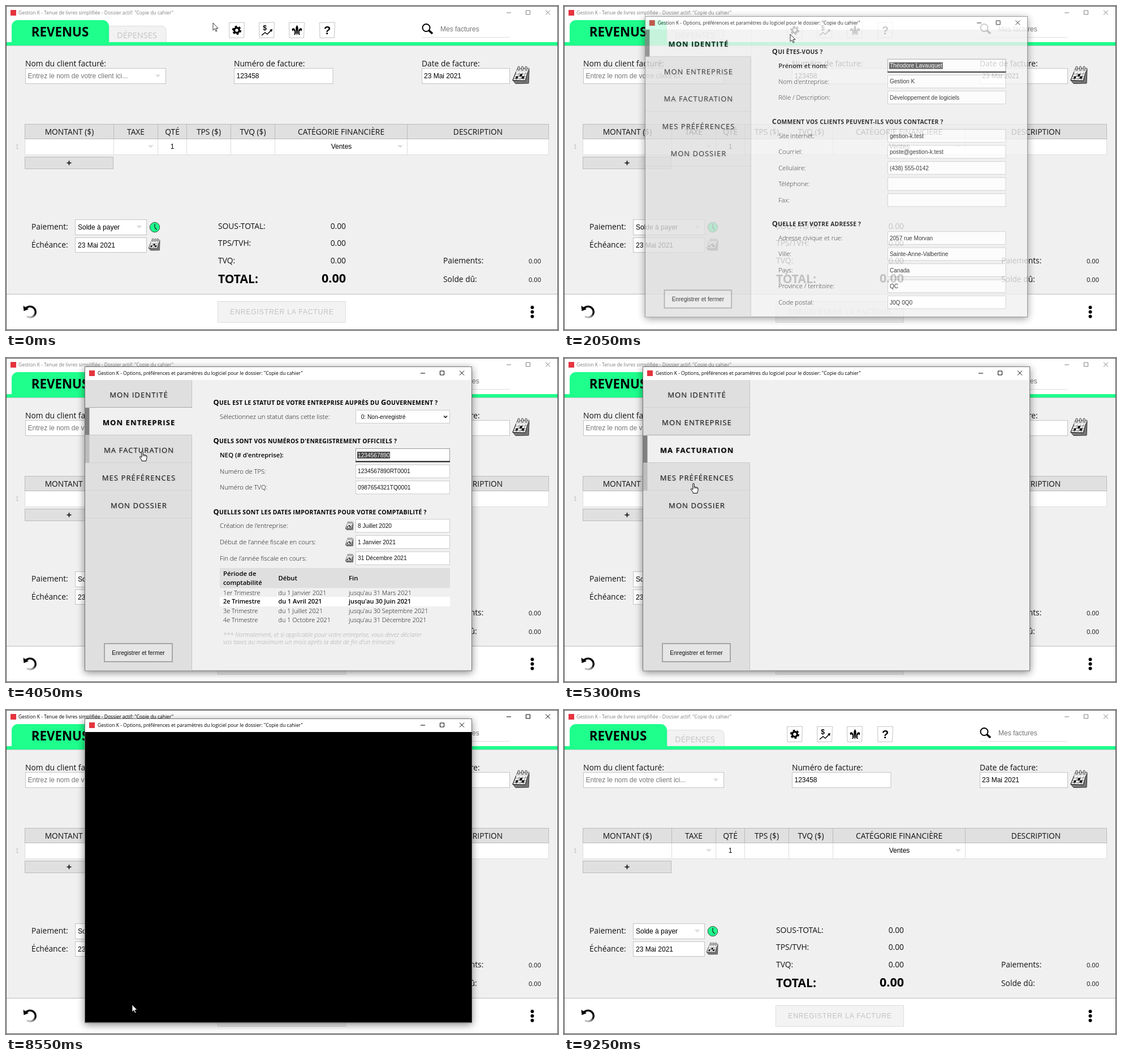
Recreate the animation shown at these times as an HTML page. Size 976 by 574 pixels, loop 9400 ms.

```html
<!DOCTYPE html>
<html lang="fr">
<head>
<meta charset="utf-8">
<title>Options du logiciel</title>
<style>
html, body { margin: 0; width: 100%; height: 100%; overflow: hidden; background: #f0f0f0; }
svg { display: block; }
text { font-family: "Open Sans", "Noto Sans", sans-serif; font-size: 13.8px; fill: #111; white-space: pre; }
.m { text-anchor: middle; }
.e { text-anchor: end; }
.f { font-family: "Liberation Sans", Arial, sans-serif; font-size: 12px; fill: #000; }
.s { font-family: "Liberation Sans", Arial, sans-serif; font-size: 10.2px; fill: #111; }
.g { fill: #757575; }
.t { font-size: 8.5px; fill: currentColor; }
.d { font-size: 11.3px; font-weight: 300; }
.r { font-size: 10.9px; font-weight: 300; }
.b { font-weight: 600; fill: #000; }
.h { font-size: 10.4px; font-weight: 700; letter-spacing: .25px; fill: #000; }
.cap { font-size: 12.8px; }
.n { font-size: 10.9px; font-weight: 300; font-style: italic; fill: #aaa; }
.tab { font-size: 13px; letter-spacing: 1.1px; text-anchor: middle; text-shadow: 1px 1px 2px #0003; }
.on { font-weight: 700; fill: #000; }
.tip { font-size: 12.2px; fill: #fff; }
.key { font: bold 10px "Liberation Mono", monospace; fill: #222; text-anchor: middle; }
.box { fill: #fff; stroke: #c4c4c4; }
.head { fill: #e0e0e0; stroke: #bbb; }
.a { animation: 9.4s step-end infinite; }
#active { color: #808080; animation: active 9.4s step-end infinite; }
#tip { animation: tip 9.4s linear infinite; }
#dialog { transform-origin: 481.75px 284.5px; animation: dialog 9.4s ease-out infinite; }
#cursor { animation: cursor 9.4s ease-in-out infinite; }
@keyframes active {
  15.4% { color: #000; } 20.2% { color: #808080; }
  90.4% { color: #000; } 98.4% { color: #808080; }
}
@keyframes tip {
  0%, 6.4% { opacity: 0; } 10.1%, 15.4% { opacity: 1; } 19.1%, 100% { opacity: 0; }
}
@keyframes dialog {
  0%, 20.2% { opacity: 0; transform: scale(.9); }
  21.81% { opacity: .8; transform: scale(.9883); }
  23.4%, 91.4% { opacity: 1; transform: none; }
  93.6%, 100% { opacity: 0; transform: scale(.9); }
}
@keyframes cursor {
  0%, .4% { transform: translate(366px, 30px); }
  6%, 11.2% { transform: translate(400px, 48px); }
  11.7%, 26.4% { transform: translate(400px, 50px); }
  35.1%, 40.2% { transform: translate(247px, 120px); }
  43.09% { transform: translate(241px, 165px); }
  46.3%, 48.7% { transform: translate(234px, 168px); }
  48.9%, 50.3% { transform: translate(233px, 169px); }
  54.8%, 56.2% { transform: translate(230px, 221px); }
  56.4%, 66.8% { transform: translate(229px, 222px); }
  70.2%, 71.6% { transform: translate(227px, 263px); }
  71.8%, 79.6% { transform: translate(227px, 264px); }
  86.7%, 100% { transform: translate(223px, 522px); }
}
</style>
</head>
<body>
<script>
const LOOP = 9400;

// Visible spans in ms: start, end, start, end...
const spans = {
  page0: [0, 3500], page1: [3500, 4750], page2: [4750, 5850], page3: [5850, 7050], page4: [7050, LOOP],
  over1: [2950, 3500], over2: [3880, 4750], over3: [4950, 5850], over4: [6400, 7050],
  focus: [3500, 4600], gear: [350, 1900], press: [8000, 8500], black: [8500, LOOP],
  arrow: [0, 350, 1900, 2950, 7600, 8000, 8500, 9250], hand: [350, 1900, 2950, 7600, 8000, 8500]
};
const frames = Object.entries(spans).map(([name, times]) =>
  `@keyframes ${name}{0%{visibility:hidden}` + times.map((t, i) =>
    `${t / LOOP * 100}%{visibility:${i % 2 ? 'hidden' : 'visible'}}`).join('') + '}').join('\n');
document.head.appendChild(document.createElement('style')).textContent = frames;

const show = (name, body) => `<g class="a" style="animation-name:${name}">${body}</g>`;
const text = (x, y, s, c = '') => `<text x="${x}" y="${y}" class="${c}">${s}</text>`;
const rect = (x, y, w, h, attr = 'class="box"') => `<rect x="${x}" y="${y}" width="${w}" height="${h}" ${attr}/>`;
const path = (d, attr = '') => `<path d="${d}" ${attr}/>`;
const line = (d, color = '#000', w = 1) => path(d, `fill="none" stroke="${color}" stroke-width="${w}"`);
const drop = (x, y) => path(`M${x - 5} ${y - 2.5}h10l-5 5z`, 'fill="#ddd"');
const calendar = (x, y, w) => `<use href="#cal" x="${x}" y="${y}" width="${w}" height="${w * 34 / 32}"/>`;
const list = (items, fn) => items.map(fn).join('');

const controls = (x, y) => line(`M${x} ${y + .5}h8M${x + 34.5} ${y - 3.5}h7v7h-7zM${x + 69} ${y - 4}l8 8m0 -8l-8 8`, 'currentColor');
const logo = (x, y) => rect(x, y, 10, 10, 'fill="#e5343f"');
const product = 'Gestion K', folder = '"Copie du cahier"';

/* main window */
const frame = (x, hot) => path(`M${x + .5} 29.5l27 -.5l-1 27.2l-25.5 .3z`,
  hot ? 'fill="#fff" stroke="#222" stroke-width="1.6"' : 'fill="#fff" stroke="#c4c4c4"');
const gear = `<g fill="none" stroke="#000"><circle cx="408" cy="43" r="4.4" stroke-width="3.4"/>
  <circle cx="408" cy="43" r="6.8" stroke-width="2.6" stroke-dasharray="3.8 3.32"/></g>`;
const curl = path('M1.9 3C2.5-1 5-4.6 7.6-3.6C9.6-2.6 9 1.4 6.6 1.6C7.2-.6 6-1.4 4 3ZM2 5H4.3C4 7 5 7.5 6 7C5 9 2.5 8.5 2 5Z');
const lily = `<g transform="translate(514.5 43)">${path('M0-9C2.8-5.5 2.8-2 1 3H-1C-2.8-2-2.8-5.5 0-9ZM-5 3.2H5V4.8H-5ZM-1.3 5H1.3L0 9Z')}
  ${curl}<g transform="scale(-1 1)">${curl}</g></g>`;

const toolbar = list([394, 447, 500, 554], x => frame(x)) + show('gear', frame(394, true)) + gear +
  text(457.5, 43, '$', 'f m b') + line('M452 52l6 -5l4 3l7 -7', '#000', 1.5) + path('M471 41l-1 5l-4 -4z') +
  lily + text(568, 50, '?', 'f m" style="font-size:20px;font-weight:700') +
  `<circle cx="743" cy="38.5" r="6.5" fill="none" stroke="#000" stroke-width="2"/>` + line('M748 43.5l6 5.5', '#000', 3.6) +
  text(768, 45, 'Mes factures', 'f g') + line('M735 55.5h155', '#ddd');

const header = rect(0, 0, 976, 64, 'fill="#fff"') + logo(8, 7) +
  `<g id="active">${text(22, 15, `${product} - Tenue de livres simplifiée - Dossier actif: ${folder}`, 't')}${controls(885, 11.5)}</g>` +
  path('M182.5 64V35.5H275a8 8 0 0 1 8 8V64', 'fill="#f2f2f2" stroke="#ddd"') +
  text(231.5, 57, 'DÉPENSES', 'm" style="font-size:14.6px;fill:#c4c4c4') +
  path('M10 70V36a11 11 0 0 1 11 -11H171a11 11 0 0 1 11 11V64H976V70H0V64H10z', 'fill="#1eff8c"') +
  line('M0 70.5H976', '#ccc') + text(95.5, 54, 'REVENUS', 'm" style="font-size:22.3px;font-weight:700;fill:#000');

const fields = text(34, 106.5, 'Nom du client facturé:') + rect(34.5, 110.5, 248, 27) +
  text(38.5, 128, 'Entrez le nom de votre client ici...', 'f g') + drop(268.5, 124) +
  text(403, 106.5, 'Numéro de facture:') + rect(403.5, 110.5, 174.5, 27) + text(407.5, 128, '123458', 'f') +
  text(735, 106.5, 'Date de facture:') + rect(735.5, 110.5, 155, 27) + text(739, 128, '23 Mai 2021', 'f') + calendar(895, 105.5, 32);

const cols = [33.5, 190.5, 268.5, 319.5, 397.5, 475.5, 709.5, 959.5];
const titles = ['MONTANT ($)', 'TAXE', 'QTÉ', 'TPS ($)', 'TVQ ($)', 'CATÉGORIE FINANCIÈRE', 'DESCRIPTION'];
const table = list(titles, (s, i) => {
  const x = cols[i], w = cols[i + 1] - x;
  return rect(x, 235.5, w, 28, 'fill="#fff" stroke="#ddd"') + rect(x, 209.5, w, 26, 'class="head"') + text(x + w / 2, 228.3, s, 'm');
}) + text(17, 253, '1', 's" style="fill:#bbb') + drop(256, 249) + text(294, 252.5, '1', 'f m') +
  text(593, 252.5, 'Ventes', 'f m') + drop(697, 249) + rect(33.5, 267.5, 156, 21, 'class="head"') + line('M107.5 278h8m-4 -4v8', '#000', 1.5);

const totals = text(45, 396, 'Paiement:') + rect(122.5, 378.5, 126, 27) + text(127, 396, 'Solde à payer', 'f') + drop(235.5, 391.5) +
  text(45, 427.5, 'Échéance:') + rect(122.5, 410.5, 126, 26) + text(127, 427.5, '23 Mai 2021', 'f') +
  '<circle cx="263" cy="392" r="8.7" fill="#1eff8c" stroke="#444"/>' + line('M263 386v6.5l3.5 4', '#222', 1.3) + calendar(251.5, 411, 22) +
  list([['SOUS-TOTAL:', 394.5], ['TPS/TVH:', 425], ['TVQ:', 456]], ([s, y]) => text(375, y, s) + text(601, y, '0.00', 'e')) +
  text(375, 490.5, 'TOTAL:', '" style="font-size:21px;font-weight:700;fill:#000') +
  text(601, 490, '0.00', 'e" style="font-size:21.5px;font-weight:700;fill:#000') +
  list([['Paiements:', 456], ['Solde dû:', 489]], ([s, y]) => text(773, y, s) + text(946, y - .5, '0.00', 'e" style="font-size:11.1px'));

const footer = rect(0, 511, 976, 63, 'fill="#fff"') + line('M0 510.5H976', '#bbb') +
  rect(374.5, 523.5, 226, 37, 'fill="#f3f3f3" stroke="#ddd"') +
  text(488, 546, 'ENREGISTRER LA FACTURE', 'f m" style="font-size:12.2px;letter-spacing:.8px;fill:#c2c2c2') +
  line('M35 536a9.7 9.7 0 1 1 2 14', 'url(#fade)', 3.3) + path('M30.5 531l1 9.5l8.5 -3.5z') +
  list([534, 542, 550], y => `<circle cx="930.5" cy="${y}" r="3"/>`);

const tooltip = `<g id="tip">${path('M408 74.5l6 7h-12z', 'fill="#2f2f2f"')}${rect(318, 81, 179, 45, 'rx="4" fill="#2f2f2f"')}` +
  text(326, 98.5, 'Options du logiciel.', 'tip') + text(326, 116.5, '(Raccourci clavier :', 'tip') +
  rect(433, 105, 28, 16.5, 'rx="3" fill="#eee"') + text(447, 117, 'Alt', 'key') + text(462.5, 116.5, '+', 'tip') +
  rect(470.5, 105, 14.5, 16.5, 'rx="3" fill="#eee"') + text(477.8, 117, 'O', 'key') + text(485.5, 116.5, ')', 'tip') + '</g>';

/* options dialog */
const title = (y, s) => text(366.5, y, s.replace(/\p{L}/gu, c =>
  c === c.toUpperCase() ? `<tspan class="cap">${c}</tspan>` : c.toUpperCase()), 'h');
const row = (y, label, value, x = 573) => text(378, y + 4, label, 'd') +
  rect(x + .5, y - 11.5, 784 - x, 23, 'fill="#fff" stroke="#ccc"') + text(x + 4, y + 3.7, value, 's');
const focused = (y, label, value, x, w) => rect(377, y - 9, 160, 17, 'fill="#f0f0f0"') + text(378, y + 4, label, 'd b') +
  rect(x + .5, y - 11.5, 784 - x, 23, 'fill="#fff" stroke="#999"') + rect(x, y + 10.5, 785 - x, 2, 'fill="#111"') +
  rect(x + 3, y - 6, w, 12, 'fill="#444"') + text(x + 4, y + 3.7, value, 's" style="fill:#fff');
const check = (y, label, on) => text(378, y + 4, label, 'd') + (on
  ? rect(769.5, y - 7.5, 15, 15, 'rx="2" fill="#0075ff"') + line(`M772.5 ${y}l3.2 3.4l6 -7`, '#fff', 2.2)
  : rect(770, y - 7, 14, 14, 'rx="2" fill="#fff" stroke="#767676"'));

const identity = title(82.7, 'Qui êtes-vous ?') + focused(103.5, 'Prénom et nom:', 'Théodore Lavauquet', 573, 96) +
  row(132, "Nom d'entreprise:", product) + row(160.7, 'Rôle / Description:', 'Développement de logiciels') +
  title(208.5, 'Comment vos clients peuvent-ils vous contacter ?') +
  list([['Site internet:', 'gestion-k.test'], ['Courriel:', 'poste@gestion-k.test'], ['Cellulaire:', '(438) 555-0142'],
    ['Téléphone:', ''], ['Fax:', '']], ([a, b], i) => row(229.3 + i * 28.8, a, b)) +
  title(391.5, 'Quelle est votre adresse ?') +
  list([['Adresse civique et rue:', '2057 rue Morvan'], ['Ville:', 'Sainte-Anne-Valbertine'], ['Pays:', 'Canada'],
    ['Province / territoire:', 'QC'], ['Code postal:', 'J0Q 0Q0']], ([a, b], i) => row(412.5 + i * 28.8, a, b));

const quarters = [['1er Trimestre', 'du 1 Janvier 2021', "jusqu'au 31 Mars 2021", 419.5], ['2e Trimestre', 'du 1 Avril 2021', "jusqu'au 30 Juin 2021", 435],
  ['3e Trimestre', 'du 1 Juillet 2021', "jusqu'au 30 Septembre 2021", 452], ['4e Trimestre', 'du 1 Octobre 2021', "jusqu'au 31 Décembre 2021", 467.5]];
const company = title(83, 'Quel est le statut de votre entreprise auprès du Gouvernement ?') +
  row(104, 'Sélectionnez un statut dans cette liste:', '  0: Non-enregistré', 618) + line('M774 102.5l3 3l3 -3', '#111', 1.6) +
  title(151, "Quels sont vos numéros d'enregistrement officiels ?") +
  row(172, "NEQ (# d'entreprise):", '1234567890', 618) + show('focus', focused(172, "NEQ (# d'entreprise):", '1234567890', 618, 58)) +
  row(200.7, 'Numéro de TPS:', '1234567890RT0001', 618) + row(229.3, 'Numéro de TVQ:', '0987654321TQ0001', 618) +
  title(276.5, 'Quelles sont les dates importantes pour votre comptabilité ?') +
  list([["Création de l'entreprise:", '8 Juillet 2020'], ["Début de l'année fiscale en cours:", '1 Janvier 2021'],
    ["Fin de l'année fiscale en cours:", '31 Décembre 2021']], ([a, b], i) => row(297.3 + i * 28.7, a, b, 618) + calendar(599.5, 289 + i * 28.7, 15.5)) +
  rect(378, 372, 407, 35.5, 'fill="#dfdfdf"') + rect(378, 423, 407, 17, 'fill="#fff"') +
  text(384, 386, 'Période de', 'd b') + text(384, 402, 'comptabilité', 'd b') + text(481.5, 394, 'Début', 'd b') + text(606, 394, 'Fin', 'd b') +
  list(quarters, (q, i) => list([384, 481.5, 606], (x, k) => text(x, q[3], q[k], i === 1 ? 'r b' : 'r'))) +
  text(384, 494, '*** Normalement, et si applicable pour votre entreprise, vous devez déclarer', 'n') +
  text(384, 506.5, "vos taxes au maximum un mois après la date de fin d'un trimestre.", 'n');

const prefs = title(83, 'Table de transaction des factures:') + check(100, 'Afficher la colonne QTÉ (quantité):', 1) +
  check(121, 'Afficher les colonnes TPS ($) et TVQ ($):', 1) + check(142.3, 'Afficher les colonnes SOUS-TOTAL ($) et TOTAL ($):') +
  title(186, 'Réinitialisation des factures:') + check(202.7, 'Garder le dernier nom de client/fournisseur utilisé actif:') +
  check(224, 'Garder la dernière méthode de paiement utilisée active:') +
  title(267.5, 'Paiements des factures:') + check(284.7, 'Égaliser le montant total des paiements avec le total facturé:', 1) +
  check(306, 'Changer la date de facturation change aussi la date du paiement #1:', 1);

const tabs = ['MON IDENTITÉ', 'MON ENTREPRISE', 'MA FACTURATION', 'MES PRÉFÉRENCES', 'MON DOSSIER'];
const sidebar = rect(140, 39, 189, 514.5, 'fill="#dfdfdf"') + line('M328.5 39V553.5', '#c4c4c4') +
  list(tabs, (s, i) => {
    const y = 39 + i * 49.1, label = c => text(235, y + 30.5, s, 'tab ' + c);
    return line(`M140 ${Math.round(y + 49) - .5}H328`, '#d2d2d2') + label('') +
      (i ? show('over' + i, rect(140, y, 7.5, 48.5, 'fill="#bdbdbd"')) : '') +
      show('page' + i, rect(140, y, 189, 49, 'fill="#f0f0f0"') + rect(140, y, 7.5, 48.5, 'fill="#808080"') +
        (i ? line(`M147.5 ${Math.round(y) - .5}H329`, '#a8a8a8') : '') + line(`M147.5 ${Math.round(y + 49) - .5}H329`, '#c4c4c4') + label('on'));
  }) + rect(174, 506, 120, 32, 'fill="#e6e6e6" stroke="#a6a6a6" stroke-width="2"') +
  show('press', rect(174, 506, 120, 32, 'fill="#e6e6e6" stroke="#777" stroke-width="2"')) +
  text(234, 525.7, 'Enregistrer et fermer', 's m');

const dialog = `<g id="dialog">${rect(139.5, 15.5, 684, 538.5, 'fill="#f0f0f0" stroke="#777" style="filter:drop-shadow(0 3px 7px #0007)"')}` +
  rect(140, 16, 683, 23, 'fill="#fff"') + logo(147, 22) +
  text(162, 30, `${product} - Options, préférences et paramètres du logiciel pour le dossier: ${folder}`, 't') + controls(733, 26.5) +
  sidebar + show('page0', identity) + show('page1', company) + show('page3', prefs) +
  show('black', rect(140, 39, 683.5, 514.5, 'fill="#000"')) + '</g>';

const cursor = `<g id="cursor" stroke="#000" fill="#fff" stroke-linejoin="round">` +
  show('arrow', path('M0 0V13L3 10.2L5 15L7 14.2L5 9.5H9Z', 'stroke-width=".8"')) +
  show('hand', path('M-1.2 1.2C-1.2-.2 1.2-.2 1.2 1.2V6.3L3.5 6.7L6 7.4L8 8.5V12.5L6.8 16V17.5H-.8L-1.2 15.5L-4.5 10.8C-5 9.5-3.5 8.8-2.6 10L-1.2 11.3Z') +
    line('M1.2 6.3v3M3.6 6.8v2.7M6 7.5v2.3', '#000', .8)) + '</g>';

const defs = `<defs><linearGradient id="fade" x1=".6" y1="0" x2=".3" y2="1"><stop offset=".45"/><stop offset="1" stop-color="#ccc"/></linearGradient>
  <symbol id="cal" viewBox="0 0 32 34">${path('M1 26l5 6l23 -.5l1 -25z', 'fill="#777" stroke="#333"')}
  ${path('M9 6l20.5 -1l-6.5 22l-22 -1z', 'fill="#fff" stroke="#333" stroke-width="1.3"')}${path('M9 6l20.5 -1l-1.8 6l-21.5 .5z', 'fill="#ddd"')}
  ${line('M5.6 15l21 -.5M4 19.2l21.3 -.2M2.5 23l21.6 .3M13 12l-6 14M18.5 12l-5.5 14.4M24 11.5l-5 15', '#888')}
  ${path('M14 15h4.5l-1.6 4.2h-4.6zM17.5 19.2h4.5l-1.5 4h-4.5zM7 19.2h4l-1.7 4h-4.2z', 'fill="#111"')}
  ${list([10, 16.5, 23], x => rect(x, 1.5, 3, 7, 'rx="1.5" fill="#eee" stroke="#333"'))}</symbol></defs>`;

document.body.innerHTML = `<svg xmlns="http://www.w3.org/2000/svg" width="976" height="574" viewBox="0 0 976 574">${defs}
  ${rect(0, 0, 976, 574, 'fill="#f0f0f0"')}${header}${toolbar}${fields}${table}${totals}${footer}
  ${rect(.5, .5, 975, 573, 'fill="none" stroke="#555"')}${tooltip}${dialog}${cursor}</svg>`;
</script>
</body>
</html>
```
